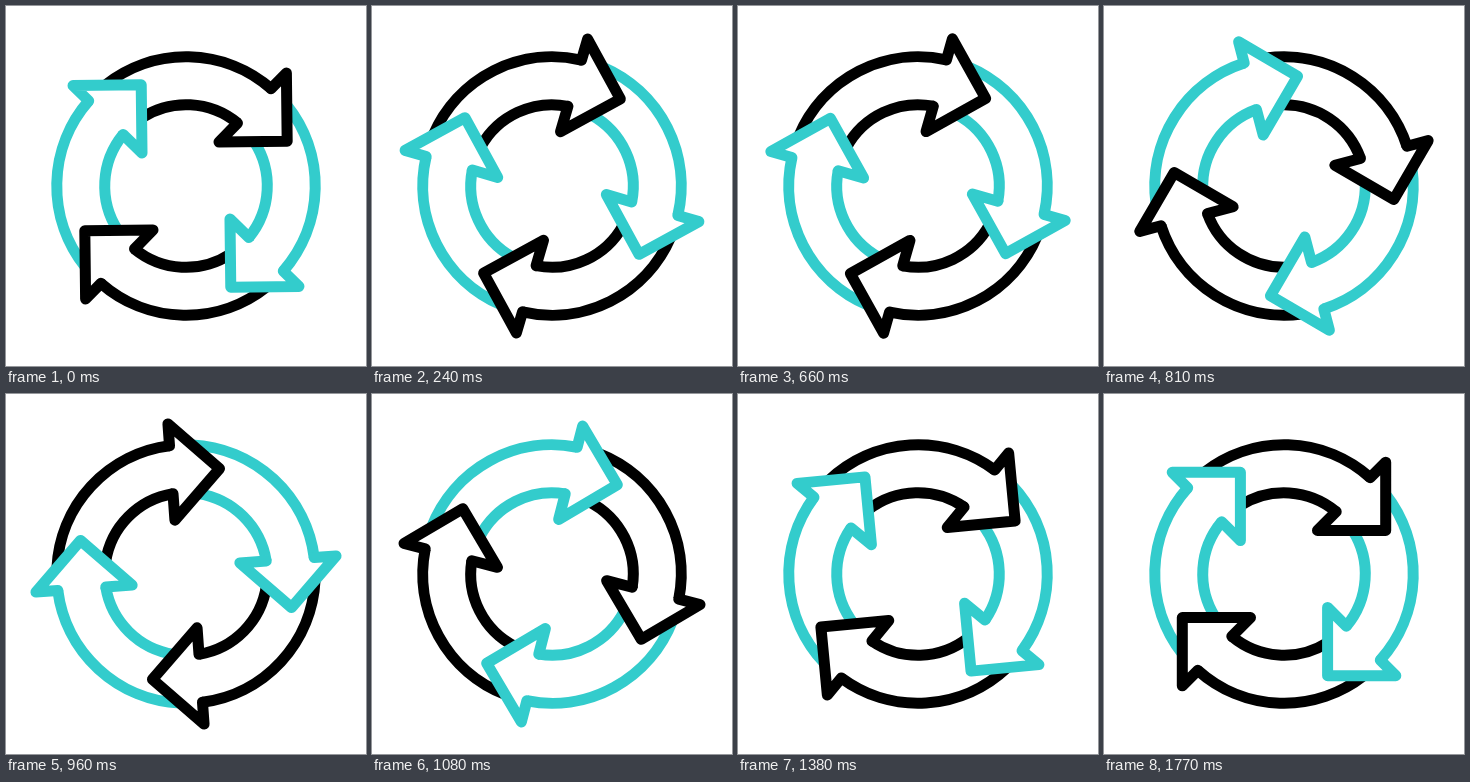
An HTML page that plays this animation: 360x360 px, repeating every 1.8 s.

```html
<!DOCTYPE html>
<html lang="en">
<head>
<meta charset="utf-8">
<title>Cycle arrows</title>
<style>
  html, body { margin: 0; width: 100%; height: 100%; overflow: hidden; background: #fff; }
  svg { display: block; width: 100%; height: 100%; }
</style>
</head>
<body>
<svg viewBox="-180 -180 360 360">
  <defs>
    <path id="arcs" d="M-79.7-101.7A129.2 129.2 0 0 1 86.2-96.3M-43.6-68.6A81.3 81.3 0 0 1 52.2-62.3"/>
    <path id="head" d="M86.2-96.3L101.7-111.8V-43.6H33.5L52.2-62.3" stroke-linecap="round"/>
  </defs>
  <g id="ring" fill="none" stroke-width="11" stroke-linejoin="round"></g>
</svg>
<script>
const ring = document.getElementById('ring');
const LOOP = 1800, TICK = 30;

// Heads come after all arcs so that each one covers the tail behind it.
ring.innerHTML = ['arcs', 'head'].map(part =>
  [0, 1, 2, 3].map(i =>
    `<use href="#${part}" stroke="${i % 2 ? '#33cccc' : '#000'}" transform="rotate(${i * 90})"/>`
  ).join('')).join('');

// Keys: step, angle, and the easing handles leading to it.
const keys = [
  [0, 0],
  [14.9, -51.6, 1 / 3, 2 / 3],
  [44.4, 367, 0.47, 0.466],
  [51, 360, 1 / 3, 2 / 3]
];

// cubic-bezier(x1, 0, x2, 1)
function ease(x, x1, x2) {
  let lo = 0, hi = 1, u;
  for (let i = 0; i < 24; i++) {
    u = (lo + hi) / 2;
    const v = 1 - u;
    if (3 * v * v * u * x1 + 3 * v * u * u * x2 + u * u * u < x) lo = u;
    else hi = u;
  }
  return u * u * (3 - 2 * u);
}

function angleAt(step) {
  const i = keys.findIndex((k, j) => j && step <= k[0]);
  const [s0, a0] = keys[i - 1], [s1, a1, x1, x2] = keys[i];
  return a0 + (a1 - a0) * ease((step - s0) / (s1 - s0), x1, x2);
}

// The pose holds for one tick in every six.
function draw(now) {
  const tick = Math.floor(now % LOOP / TICK);
  const step = tick - Math.trunc((tick - 1) / 6) + 1;
  ring.setAttribute('transform', `rotate(${angleAt(step)})`);
}

const start = performance.now();
function loop() {
  draw(performance.now() - start);
  requestAnimationFrame(loop);
}
loop();
</script>
</body>
</html>
```
